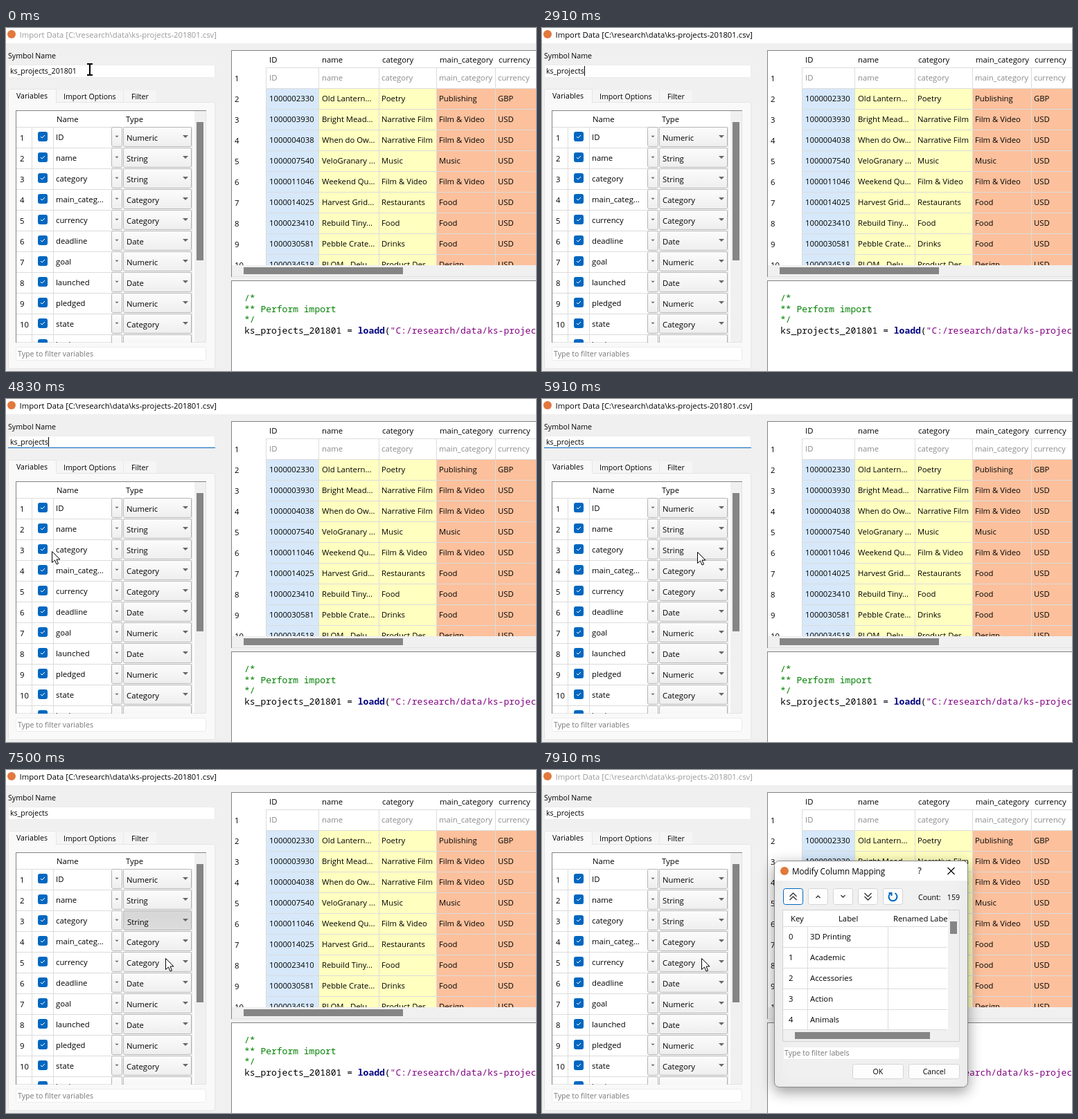
An HTML page with a canvas for the animation above (8000 ms loop, 765 by 496 pixels).

```html
<!DOCTYPE html>
<html lang="en">
<head>
<meta charset="utf-8">
<title>Import data</title>
<style>
  html, body { margin: 0; width: 100%; height: 100%; overflow: hidden; background: #f0f0f0; }
  canvas { display: block; }
</style>
</head>
<body>
<canvas id="stage" width="765" height="496"></canvas>
<script>
const ctx = document.getElementById('stage').getContext('2d');
const LOOP = 8000, STEPS = 96;
const SANS = '"Open Sans", "Noto Sans", sans-serif';
const UI = `10.6px ${SANS}`, CELL = `11.3px ${SANS}`;
const MONO = '13px "Noto Sans Mono", monospace';
const INK = '#000', BLUE = '#0067c0', THUMB = '#858585', GRID = '#dcdcdc', ICON = '#e2783c';

const FOCUS = 330, DELETE = 2080, POINTER_BACK = 3410;
const POPUP_OPEN = 6410, POPUP_CLOSE = 7160, DIALOG = 7750;
const CARET_FLIPS = [1830, 2080, 2500, 2910, 3250, 3830, 4250, 4660, 5080, 5500, 5910, 6330];
// time, x, y
const POINTER = [
  [500, 121, 60], [1250, 63, 61], [3330, 63, 61], [3750, 83, 132], [4160, 95, 185],
  [4580, 66, 222], [4830, 66, 220], [5000, 66, 220], [5160, 222, 220], [5660, 222, 220],
  [6250, 228, 222], [6410, 228, 222], [6750, 228, 249], [7000, 230, 268], [7500, 230, 272],
];

const VARIABLES = [
  ['ID', 'Numeric'], ['name', 'String'], ['category', 'String'], ['main_categ...', 'Category'],
  ['currency', 'Category'], ['deadline', 'Date'], ['goal', 'Numeric'], ['launched', 'Date'],
  ['pledged', 'Numeric'], ['state', 'Category'], ['backers', 'Numeric'],
];
const COLUMNS = [380, 456, 543, 626, 711];
const HEADINGS = ['ID', 'name', 'category', 'main_category', 'currency'];
const RECORDS = [
  ['1000002330', 'Old Lantern...', 'Poetry', 'Publishing', 'GBP'],
  ['1000003930', 'Bright Mead...', 'Narrative Film', 'Film & Video', 'USD'],
  ['1000004038', 'When do Ow...', 'Narrative Film', 'Film & Video', 'USD'],
  ['1000007540', 'VeloGranary ...', 'Music', 'Music', 'USD'],
  ['1000011046', 'Weekend Qu...', 'Film & Video', 'Film & Video', 'USD'],
  ['1000014025', 'Harvest Grid...', 'Restaurants', 'Food', 'USD'],
  ['1000023410', 'Rebuild Tiny...', 'Food', 'Food', 'USD'],
  ['1000030581', 'Pebble Crate...', 'Drinks', 'Food', 'USD'],
  ['1000034518', 'PLOM - Delu...', 'Product Des...', 'Design', 'USD'],
];

function text(str, x, y, font = CELL, color = INK, align = 'left') {
  ctx.font = font;
  ctx.fillStyle = color;
  ctx.textAlign = align;
  ctx.fillText(str, x, y + 4);
}

function rect(x, y, w, h, fill) {
  ctx.fillStyle = fill;
  ctx.fillRect(x, y, w, h);
}

function box(x, y, w, h, fill, border, radius = 0) {
  ctx.beginPath();
  ctx.roundRect(x + .5, y + .5, w - 1, h - 1, radius);
  ctx.fillStyle = fill;
  ctx.fill();
  ctx.strokeStyle = border;
  ctx.lineWidth = 1;
  ctx.stroke();
}

// White panel with a dark top and left edge and a pale bottom and right edge.
function sunken(x, y, w, h) {
  box(x, y, w, h, '#fff', '#e3e3e3');
  rect(x, y, w, 1, '#828282');
  rect(x, y, 1, h, '#828282');
}

function stroke(path, color, width = 1, x = 0, y = 0) {
  ctx.save();
  ctx.translate(x, y);
  ctx.strokeStyle = color;
  ctx.lineWidth = width;
  ctx.stroke(new Path2D(path));
  ctx.restore();
}

function clipped(x, y, w, h, draw) {
  ctx.save();
  ctx.beginPath();
  ctx.rect(x, y, w, h);
  ctx.clip();
  draw();
  ctx.restore();
}

function dot(x, y) {
  ctx.fillStyle = ICON;
  ctx.beginPath();
  ctx.arc(x, y, 6, 0, 7);
  ctx.fill();
}

function downArrow(x, y, size) {
  ctx.fillStyle = '#666';
  ctx.beginPath();
  ctx.moveTo(x - size, y - size / 2);
  ctx.lineTo(x + size, y - size / 2);
  ctx.lineTo(x, y + size / 2);
  ctx.fill();
}

function button(x, y, w, h, pressed) {
  const shade = ctx.createLinearGradient(0, y, 0, y + h);
  shade.addColorStop(0, pressed ? '#d6d6d6' : '#fcfcfc');
  shade.addColorStop(1, pressed ? '#dcdcdc' : '#eeeeee');
  box(x, y, w, h, shade, '#b4b4b4', 2);
}

function pointerAt(t) {
  const next = POINTER.findIndex(p => p[0] > t);
  if (next === 0) return POINTER[0].slice(1);
  if (next < 0) return POINTER.at(-1).slice(1);
  const [t0, x0, y0] = POINTER[next - 1], [t1, x1, y1] = POINTER[next];
  const u = (t - t0) / (t1 - t0), k = u * u * (3 - 2 * u);
  return [Math.round(x0 + (x1 - x0) * k), Math.round(y0 + (y1 - y0) * k)];
}

function symbolField(t, px) {
  const full = 'ks_projects_201801', stem = 'ks_projects';
  const focused = t >= FOCUS && t < POPUP_OPEN;
  const value = t < DELETE ? full : stem;
  box(3, 53, 299, 19, '#fff', '#ececec', 2);
  if (focused && t >= POINTER_BACK) {
    ctx.globalAlpha = Math.min(1, (t - POINTER_BACK) / 750);
    rect(3, 70, 299, 1, BLUE);
    ctx.globalAlpha = 1;
  }
  text(value, 6, 62, UI);
  if (!focused) return;

  const edge = n => 6 + Math.round(ctx.measureText(full.slice(0, n)).width);
  let caret = value.length;
  if (t < DELETE) {
    while (caret > stem.length && edge(caret) > px) caret--;
    const start = edge(caret), width = edge(full.length) - start;
    rect(start, 55, width, 14, '#0078d7');
    clipped(start, 55, width, 14, () => text(full, 6, 62, UI, '#fff'));
  }
  const visible = CARET_FLIPS.filter(flip => t >= flip).length % 2 === 0;
  const selecting = caret < value.length;
  if (visible) rect(edge(caret), 55, selecting ? 2 : 1, 14, selecting ? '#ff8728' : '#000');
}

function variableTable(t, px, py) {
  sunken(14, 119, 275, 336);
  const hoverHeader = t >= POINTER_BACK && px > 68 && px < 168 && py > 119 && py < 144;
  if (hoverHeader) rect(69, 120, 99, 23, '#d9ebf9');
  text('Name', 73, 132);
  text('Type', 173, 132);

  clipped(15, 120, 273, 335, () => {
    VARIABLES.forEach(([name, type], i) => {
      const y = 158 + 30 * i;
      const pressed = i === 2 && t >= POPUP_OPEN && t < DIALOG;
      rect(15, y - 15, 254, 1, GRID);
      text(i + 1, 20, y + 1);
      box(46, y - 8, 14, 14, BLUE, BLUE, 2);
      stroke('M-3 0 -1 2 3-2', '#fff', 1, 53, y - 1);
      text(name, 72, y);
      button(152, y - 15, 16, 29);
      downArrow(160, y - 1, 2.5);
      button(169, y - 15, 99, 29, pressed);
      text(type, pressed ? 175 : 174, y + (pressed ? 2 : 1));
      downArrow(259, y - 1, 4);
    });
    for (const x of [37, 68, 268]) rect(x, 143, 1, 311, GRID);
  });
  rect(272, 120, 16, 334, '#f0f0f0');
  rect(275, 136, 10, 200, THUMB);
}

function leftPane(t, px, py) {
  text('Symbol Name', 3, 40, UI);
  symbolField(t, px);
  rect(73, 90, 144, 18, '#f5f5f5');
  rect(169, 90, 1, 18, '#e8e8e8');
  box(3, 107, 299, 386, '#f9f9f9', '#e5e5e5', 2);
  box(3, 88, 70, 21, '#f9f9f9', '#e5e5e5', 2);
  rect(4, 106, 68, 4, '#f9f9f9');
  text('Variables', 15, 98, UI);
  text('Import Options', 83, 99, UI);
  text('Filter', 181, 99, UI);
  variableTable(t, px, py);
  box(14, 461, 275, 20, '#fff', '#ececec', 2);
  text('Type to filter variables', 17, 471, UI, '#767676');
}

function dataPane() {
  sunken(325, 32, 445, 328);
  clipped(326, 33, 439, 310, () => {
    rect(376, 87, 75, 256, '#d6e8fa');
    rect(451, 87, 170, 256, '#ffffc0');
    rect(621, 87, 144, 256, '#fcc09c');
    for (const x of [375, 451, 538, 621, 706]) rect(x, 57, 1, 286, GRID);
    for (let y = 57; y < 343; y += 30) rect(376, y, 389, 1, GRID);
    HEADINGS.forEach((name, i) => {
      text(name, COLUMNS[i], 46);
      text(name, COLUMNS[i] - (i > 1), 72, CELL, '#8a8a8a');
    });
    text(1, 330, 73);
    RECORDS.forEach((record, r) => {
      const y = 102 + 30 * r;
      text(r + 2, 330, y + 1);
      record.forEach((value, c) => text(value, COLUMNS[c] - (c > 1), y));
    });
  });
  rect(326, 343, 439, 16, '#f0f0f0');
  rect(343, 346, 230, 10, THUMB);
}

function codePane() {
  sunken(325, 365, 445, 140);
  ['/*', '** Perform import', '*/'].forEach((line, i) =>
    text(line, 344, Math.round(391 + 15.7 * i), MONO, '#008000'));
  let x = 344;
  const parts = [
    ['ks_projects_201801 = ', INK, ''], ['loadd', '#000080', 'bold '],
    ['(', INK, ''], ['"C:/research/data/ks-projects-201801.csv"', '#800080', ''],
  ];
  for (const [part, color, weight] of parts) {
    text(part, x, 438, weight + MONO, color);
    x += ctx.measureText(part).width;
  }
}

function typePopup(py) {
  ctx.save();
  ctx.shadowColor = 'rgba(0,0,0,.4)';
  ctx.shadowBlur = 4;
  ctx.shadowOffsetX = ctx.shadowOffsetY = 1;
  rect(169, 204, 99, 98, '#f0f0f0');
  ctx.restore();
  box(169, 204, 99, 98, '#f0f0f0', '#a8a8a8');
  const active = py >= 253 ? 2 : 0;
  ['String', 'Numeric', 'Category', 'Date'].forEach((type, i) => {
    const y = 205 + 24 * i;
    if (i === active) rect(170, y, 97, 23, '#0078d7');
    text(type, 177, y + 12, CELL, i === active ? '#fff' : INK);
  });
}

function mappingDialog() {
  ctx.save();
  ctx.shadowColor = 'rgba(0,0,0,.4)';
  ctx.shadowBlur = 20;
  ctx.shadowOffsetY = 6;
  box(335, 131, 280, 328, '#f0f0f0', '#8c8c8c', 7);
  ctx.restore();
  ctx.beginPath();
  ctx.roundRect(336, 132, 278, 28, [7, 7, 0, 0]);
  ctx.fillStyle = '#fff';
  ctx.fill();
  dot(350, 146);
  text('Modify Column Mapping', 361, 147, `11.7px ${SANS}`);
  text('?', 545, 146, `13px ${SANS}`, INK, 'center');
  stroke('M-5-5 5 5M5-5-5 5', INK, 1.1, 590.5, 146);

  const icons = [
    'M-5 0 0-5 5 0M-5 5 0 0 5 5', 'M-3 2 0-1 3 2', 'M-3-2 0 1 3-2',
    'M-5-5 0 0 5-5M-5 0 0 5 5 0', 'M-3-5A6 6 0 1 0 3-5M-6-5H-2V-1',
  ];
  icons.forEach((icon, i) => {
    const x = 348 + 36 * i, last = i === 4;
    box(x, 171, 29, 24, '#fdfdfd', i ? '#d4d4d4' : BLUE, 3);
    stroke(icon, last ? BLUE : '#333', last ? 2 : 1.3, x + 14.5, 183);
  });
  text('Count:', 543, 184, UI);
  text('159', 603, 184, UI, INK, 'right');

  box(347, 202, 256, 191, '#fff', '#d0d0d0');
  clipped(348, 203, 237, 173, () => {
    text('Key', 359, 215);
    text('Label', 428, 215);
    text('Renamed Label', 507, 215);
    ['3D Printing', 'Academic', 'Accessories', 'Action', 'Animals'].forEach((label, i) => {
      rect(348, 226 + 30 * i, 237, 1, GRID);
      text(i, 356, 241 + 30 * i);
      text(label, 387, 241 + 30 * i);
    });
    for (const x of [383, 499]) rect(x, 226, 1, 150, GRID);
    rect(348, 375, 237, 1, GRID);
  });
  rect(586, 203, 16, 189, '#f0f0f0');
  rect(348, 376, 254, 16, '#f0f0f0');
  rect(589, 219, 10, 18, THUMB);
  rect(365, 379, 195, 10, THUMB);

  box(348, 400, 255, 19, '#fff', '#ececec', 2);
  text('Type to filter labels', 350, 409, UI, '#767676');
  [['OK', 448], ['Cancel', 529]].forEach(([label, x]) => {
    box(x, 425, 74, 22, '#fdfdfd', '#d4d4d4', 3);
    text(label, x + 37, 436, UI, INK, 'center');
  });
}

function pointer(t, x, y) {
  if (t >= DELETE && t < POINTER_BACK) return;
  if (y > 52 && y < 72) {
    stroke('M-4-8H-1L0-7 1-8H4M0-7V7M-4 8H-1L0 7 1 8H4', '#000', 2, x, y);
    return;
  }
  ctx.save();
  ctx.translate(x + .5, y + .5);
  const arrow = new Path2D('M0 0V16L4 12.5 6.5 18.5 9 17.5 6.5 11.5H11.5Z');
  ctx.fillStyle = '#fff';
  ctx.fill(arrow);
  ctx.strokeStyle = '#000';
  ctx.lineWidth = 1;
  ctx.stroke(arrow);
  ctx.restore();
}

function draw(t) {
  const [px, py] = pointerAt(t);
  const active = t >= FOCUS && t < DIALOG;
  rect(0, 0, 765, 496, '#f0f0f0');
  rect(0, 0, 765, 22, '#fff');
  dot(8, 9);
  text('Import Data [C:\\research\\data\\ks-projects-201801.csv]', 19.5, 10, CELL,
    active ? INK : '#999');
  leftPane(t, px, py);
  dataPane();
  codePane();
  if (t >= POPUP_OPEN && t < POPUP_CLOSE) typePopup(py);
  if (t >= DIALOG) mappingDialog();
  pointer(t, px, py);
}

// The screen advances in twelfths of a second.
function tick() {
  const elapsed = performance.now() % LOOP;
  const step = Math.min(STEPS - 1, Math.floor((elapsed + 9) * STEPS / LOOP));
  draw(Math.floor(step * LOOP / STEPS / 10) * 10);
  requestAnimationFrame(tick);
}
tick();
</script>
</body>
</html>
```
